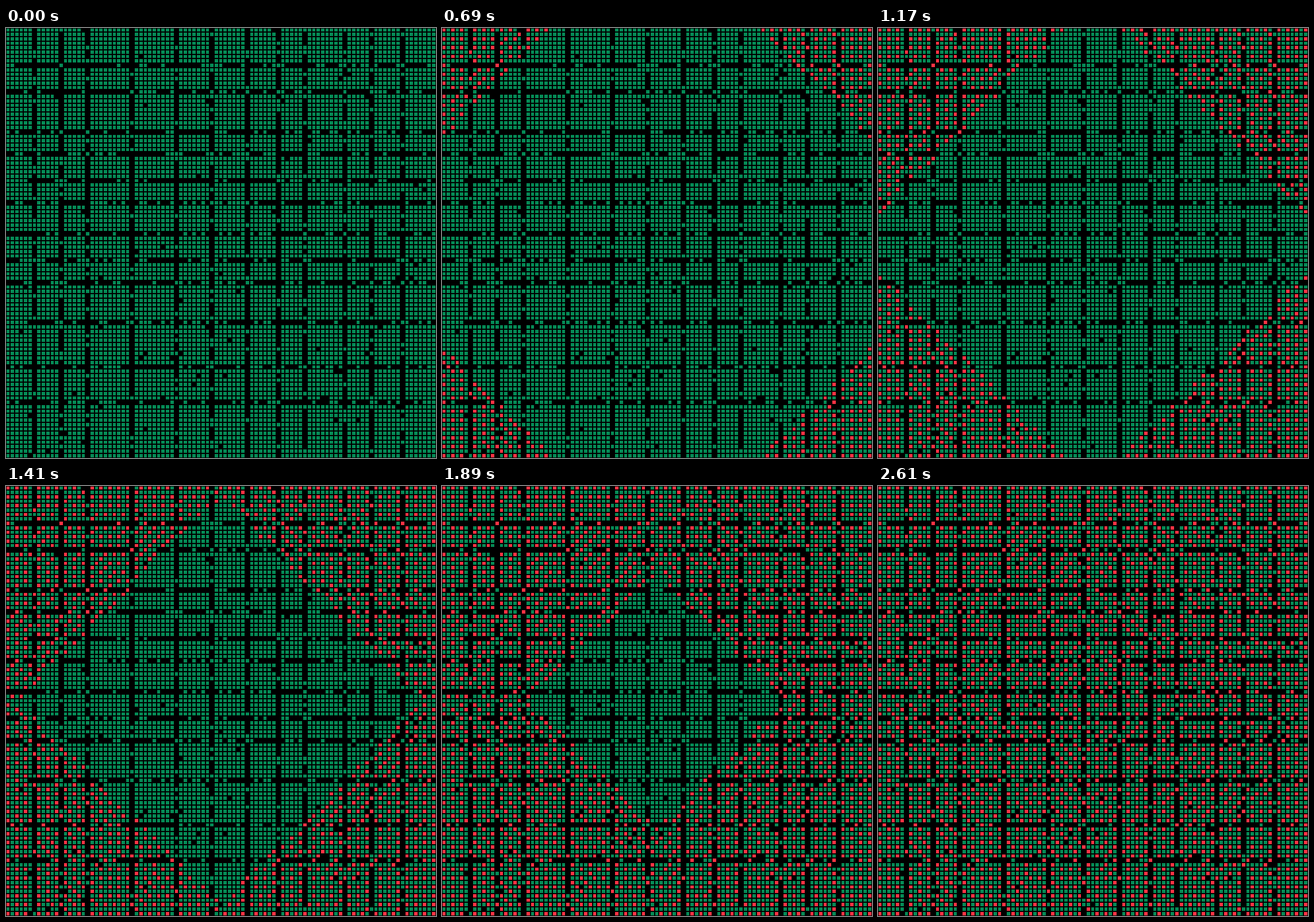
These frames come from a looping animation (748x748 px, 2730 ms). An HTML page with a canvas:

```html
<!DOCTYPE html>
<html lang="en">
<head>
<meta charset="utf-8">
<title>Spreading grid</title>
<style>
  html, body { margin: 0; width: 100%; height: 100%; overflow: hidden; background: #000; }
  canvas { display: block; }
</style>
</head>
<body>
<canvas id="stage" width="748" height="748"></canvas>
<script>
const SIZE = 748, N = 97, LOOP = 2730, FIRST = 30, STEP = 60, LAST = 43;
const GREEN = '#058b56', RED = '#ff3344';
const ctx = document.getElementById('stage').getContext('2d');

const streetCols = [6, 12, 18, 28, 38, 46, 54, 61, 67, 76, 82, 89];
const streetRows = [8, 14, 23, 28, 34, 39, 46, 52, 57, 66, 76, 84];
// Single gaps inside the blocks, as column, row.
const holes = [
  [30, 6], [31, 17], [45, 16], [62, 16], [77, 10], [75, 11], [17, 41], [43, 33], [60, 41], [94, 36],
  [92, 35], [35, 49], [29, 50], [52, 59], [50, 70], [21, 56], [4, 58], [48, 55], [70, 72], [31, 73],
  [30, 74], [39, 73], [37, 74], [39, 61], [43, 78], [49, 78], [42, 80], [15, 82], [35, 83], [72, 83],
  [71, 83], [21, 67], [3, 68], [45, 67], [84, 67], [74, 77], [75, 77], [81, 73], [78, 58], [91, 56],
  [92, 53], [88, 56], [63, 29], [68, 25], [74, 88], [79, 88], [31, 90], [48, 94], [5, 87], [13, 91],
  [17, 93], [9, 95], [5, 96], [21, 85], [88, 85], [11, 15], [81, 15], [17, 0], [60, 0]
];

let seed = 20;
function random() {
  seed = (seed * 1664525 + 1013904223) >>> 0;
  return seed / 4294967296;
}

const at = (x, y) => y * N + x;
const inside = (x, y) => x >= 0 && y >= 0 && x < N && y < N;
const fromCorner = (x, y) => Math.min(x, N - 1 - x) + Math.min(y, N - 1 - y);

function buildCells() {
  const solid = new Array(N * N).fill(true);
  for (const y of streetRows)
    for (let x = 0; x < N; x++) solid[at(x, y)] = random() < 0.33;
  for (const x of streetCols)
    for (let y = 0; y < N; y++)
      if (!streetRows.includes(y)) solid[at(x, y)] = random() < 0.22;
  for (const [x, y] of holes) solid[at(x, y)] = false;
  return solid;
}

// Rings grow from the corners; a cell turns red when no earlier red touches it
// or faces it across a single gap.
function spread(solid) {
  const start = new Array(N * N).fill(Infinity);
  const rings = Array.from({ length: N }, () => []);
  for (let y = 0; y < N; y++)
    for (let x = 0; x < N; x++)
      if (solid[at(x, y)]) rings[fromCorner(x, y)].push([x, y]);

  const isRed = (x, y) => inside(x, y) && start[at(x, y)] < Infinity;
  const isFree = (x, y) => {
    for (let dy = -1; dy <= 1; dy++)
      for (let dx = -1; dx <= 1; dx++) {
        if (isRed(x + dx, y + dy)) return false;
        if (dx * dy === 0 && isRed(x + 2 * dx, y + 2 * dy) && !solid[at(x + dx, y + dy)]) return false;
      }
    return true;
  };

  rings.forEach((ring, d) => {
    const step = Math.min(LAST, Math.max(0, Math.ceil((d - 1.2) / 2.13)));
    for (const [x, y] of ring.filter(c => isFree(...c))) start[at(x, y)] = step;
  });
  return start;
}

const solid = buildCells();
const redFrom = spread(solid);
const edge = i => Math.floor(i * SIZE / N);

function draw(steps) {
  ctx.fillStyle = '#000';
  ctx.fillRect(0, 0, SIZE, SIZE);
  for (let y = 0; y < N; y++)
    for (let x = 0; x < N; x++) {
      const i = at(x, y);
      if (!solid[i]) continue;
      ctx.fillStyle = redFrom[i] < steps ? RED : GREEN;
      ctx.fillRect(edge(x) + 1, edge(y) + 1, edge(x + 1) - edge(x) - 2, edge(y + 1) - edge(y) - 2);
    }
}

const origin = performance.now();
let shown = -1;
function tick() {
  const t = (performance.now() - origin) % LOOP;
  const steps = t < FIRST ? 0 : Math.min(LAST + 1, Math.floor((t - FIRST) / STEP) + 1);
  if (steps !== shown) draw(shown = steps);
  requestAnimationFrame(tick);
}
tick();
</script>
</body>
</html>
```
